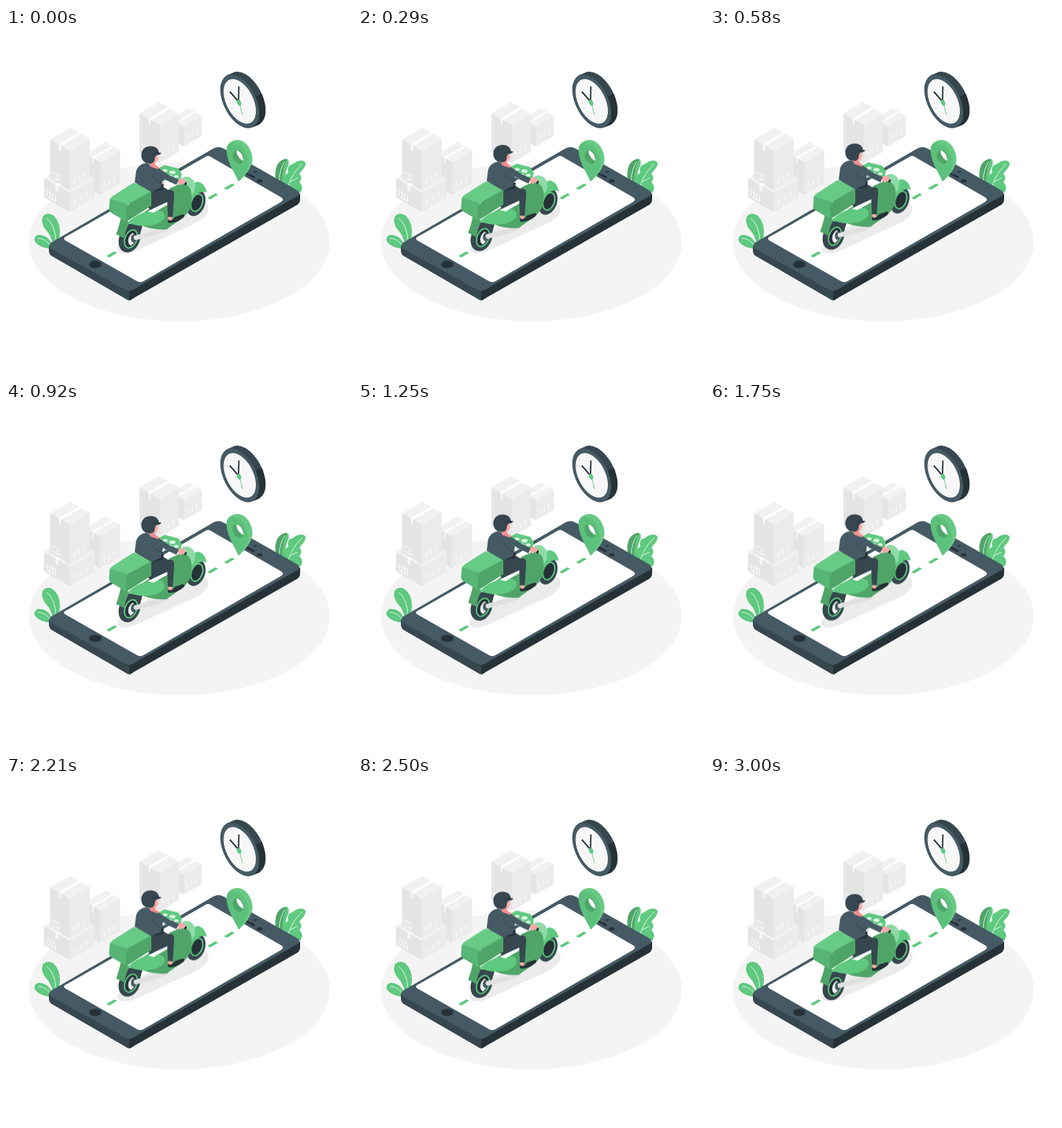
Animation of 500x500 px, one loop 3.04 s. Source, as an HTML page:

```html
<!DOCTYPE html>
<html lang="en">
<head>
<meta charset="utf-8">
<title>Scooter delivery</title>
<style>
html, body { margin: 0; width: 100%; height: 100%; overflow: hidden; background: #fff; }
svg { display: block; width: 100vw; height: 100vh; }
</style>
</head>
<body>
<svg viewBox="0 0 500 500">
  <ellipse cx="250.5" cy="309" rx="217.5" ry="115" fill="#f4f4f4"/>
  <g id="boxes"></g>

  <g id="plants" fill="#5fc97f">
    <path d="M64 319Q48 317 42 309Q39 302 46 299Q60 298 67 313Z"/>
    <path d="M68 314Q66 300 57 291Q50 282 53 273Q58 266 67 270Q78 278 78 296L76 309Z"/>
    <path d="M392 222C389 207 391 194 401 190C408 187 410 192 408 199C404 207 403 215 403 225Z"/>
    <path d="M390 220C388 207 390 194 401 190Q406 188 405 193C400 203 399 213 399 224Z" fill="#4fa568"/>
    <path d="M402 228C400 218 402 212 408 209C406 202 409 197 414 197C420 191 430 189 433 195C433 203 426 206 424 211C429 215 426 220 424 223C429 227 429 234 425 238Z"/>
    <g fill="none" stroke="#fff" stroke-width="1" opacity=".85">
      <path d="M46 304Q58 304 64 315M59 275Q71 285 72 307M395 220Q395 205 403 193"/>
      <path d="M408 228Q413 211 428 196M411 222L421 217"/>
    </g>
  </g>

  <g id="phone">
    <path d="M62 314V322Q62 327 67 330L174 392Q178 395 182 392L300 300Z" fill="#37474f"/>
    <path d="M178 378V394L420 256Q425 253 425 248V239Z" fill="#263238"/>
    <path d="M68 308.500L299 174.500Q307 169.500 315 174.500L420 234Q428 239 420 243.500L184 378Q178 381.500 172 378L67 320Q57 315 68 308.500Z" fill="#455a64"/>
    <path d="M87 302L288 187Q292 184.500 296 187L397 245Q402 248 397 251L199 365Q194 368 189 365L87 307Q82 304.500 87 302Z" fill="#fff" stroke="#fff" stroke-width="1.400"/>
    <g fill="#263238">
      <ellipse cx="129" cy="341.500" rx="9" ry="5.200"/>
      <ellipse cx="366.500" cy="221" rx="4.300" ry="2.500"/>
      <ellipse cx="360.500" cy="208" rx="2" ry="1.200"/>
    </g>
    <path d="M348 210.500L358 215.500" stroke="#263238" stroke-width="3.500" stroke-linecap="round"/>
  </g>

  <g id="dashes" fill="#5fc97f"></g>
  <path d="M161 317C160 327 173 328 188 322L274 282C287 276 295 266 292 257C288 249 271 250 260 256L170 304Z" fill="#ebebeb"/>

  <g id="pin">
    <path d="M319 172C321 165 330 161 337 162C348 164 357 178 356 192C354 205 344 215 336 222Z" fill="#68cb85"/>
    <path d="M319 181C317 169 325 163 334 167C344 172 351 185 350 197C348 209 340 215 336 222C331 210 321 197 319 181Z" fill="#5bc17b"/>
    <ellipse cx="335.500" cy="186" rx="7.500" ry="10.500" transform="rotate(-24 335.500 186)" fill="#4fa568"/>
    <path d="M333 177C338 177 343 184 343 192C338 190 333 184 333 177Z" fill="#fff"/>
  </g>

  <g id="clock"></g>

  <g id="scooter">
    <!-- front wheel -->
    <g transform="rotate(20 274.500 253)">
      <ellipse cx="274.500" cy="253" rx="13" ry="19.500" fill="#37474f"/>
      <ellipse cx="275.500" cy="252" rx="8" ry="13" fill="#263238" stroke="#5fc97f" stroke-width="2"/>
    </g>
    <path d="M261 247C262 236 269 224 277 222C285 224 289 230 290 238C282 234 272 240 268 253Z" fill="#5fc97f"/>

    <!-- rear wheel and exhaust -->
    <path d="M175 283L198 283L194 297L178 302Z" fill="#37474f"/>
    <g transform="rotate(22 178.500 304.500)">
      <ellipse cx="178.500" cy="304.500" rx="15" ry="20.500" fill="#37474f"/>
      <ellipse cx="180.500" cy="304" rx="8.500" ry="13.500" fill="#263238" stroke="#5fc97f" stroke-width="2"/>
    </g>
    <path d="M177 311Q175 302 183 296L189 302Q187 310 180 315Z" fill="#f0f0f0"/>
    <ellipse cx="184.500" cy="304" rx="4" ry="6" fill="#455a64"/>
    <path d="M188 303L206 298Q219 296 232 289" stroke="#e0e0e0" stroke-width="7" fill="none" stroke-linecap="round"/>
    <path d="M166 274L179 281Q173 289 171 304L159 298Q163 288 166 274Z" fill="#4fa568"/>

    <!-- front panel and leg shield -->
    <path d="M220 203L229 198L249 203L254 211L252 222L230 220Z" fill="#5fc97f"/>
    <g fill="#dff4e6">
      <ellipse cx="230" cy="206" rx="3.500" ry="2"/>
      <ellipse cx="240.500" cy="208.500" rx="4.500" ry="2.600"/>
      <ellipse cx="246" cy="214.500" rx="3.500" ry="2"/>
      <ellipse cx="237" cy="214" rx="3" ry="1.600"/>
    </g>
    <path d="M252 221C255 213 264 213 270 219C275 225 275 234 269 241L258 246Z" fill="#8edaa6"/>
    <path d="M236 232L252 225Q264 225 267 234Q270 245 267 259Q263 268 256 274L230 291Q226 262 236 232Z" fill="#4fa568"/>

    <!-- rear body -->
    <path d="M176 281L206 262L234 252L243 270L257 273L232 291Q211 292 198 286Z" fill="#4fa568"/>
    <path d="M176 281Q194 264 218 263Q231 264 229 275Q222 285 204 286Q188 287 176 281Z" fill="#5fc97f"/>
    <path d="M205 265L233 250L236 254L213 267Z" fill="#fff"/>
    <path d="M184 227L216 222L243 240L236 250L208 263Z" fill="#37474f"/>

    <!-- cargo box -->
    <path d="M150 248Q151 245 154 243L182 225Q185 223 189 225L211 236L174 256Z" fill="#68cb85"/>
    <path d="M150 247L176 255L174 280L152 267Q149 265 149 261Z" fill="#57b575"/>
    <path d="M173 264Q174 257 179 253L210 236V257L174 280Z" fill="#4fa568"/>

    <!-- rider -->
    <path d="M214 226Q222 222 228 226L226 236L214 236Z" fill="#263238"/>
    <path d="M210 238Q224 233 239 234Q243 235 243 240L241 273L234 274L233 250Q222 253 210 257Z" fill="#37474f"/>
    <path d="M234 273H240V279L235 278Z" fill="#ffa8a7"/>
    <path d="M234 277Q240 280 244 273L256 269Q260 271 255 275Q246 282 236 282Q233 281 234 277Z" fill="#263238"/>
    <path d="M202 195Q191 197 188 207L186 223L210 237Q218 233 224 231L228 211Q222 202 214 199Z" fill="#455a64"/>
    <path d="M248 219L255 217L259 222L253 227L249 226Z" fill="#ffa8a7"/>
    <path d="M255 222L260 223" stroke="#ffa8a7" stroke-width="4"/>
    <ellipse cx="259.500" cy="225" rx="1.600" ry="2.600" fill="#263238" transform="rotate(25 259.500 225)"/>
    <path d="M214 203L235 217L248 223" fill="none" stroke="#455a64" stroke-width="8" stroke-linejoin="round"/>
    <path d="M210 210Q213 222 229 224" fill="none" stroke="#263238" stroke-width="1" opacity=".5"/>
    <path d="M207 194L215 194L216 198L222 202L219 204L208 200Z" fill="#f28f8f"/>
    <path d="M212 184L218.500 183L220 189L217.500 194.500L212 195Z" fill="#ffa8a7"/>
    <path d="M195.500 183.500C195.500 176 201 170.700 209 170.700C216 170.700 220.500 174.500 221 180L224 181Q222 184 217 184L215 188Q216 195 208 196C200 196 195.500 191 195.500 183.500Z" fill="#37474f"/>
    <path d="M212 182Q218 180 224 181" stroke="#263238" stroke-width="1.200" fill="none"/>
  </g>
</svg>
<script>
const $ = id => document.getElementById(id);
const SLOPE = 0.577;
const poly = (points, fill) => `<polygon points="${points.join(' ')}" fill="${fill}"/>`;

// (x, y) is the near top corner; w runs left, d runs right, h runs down
function box(x, y, w, d, h, label) {
  const at = (a, b, c = 0) => [x - a * w + b * d, y - (a * w + b * d) * SLOPE + c];
  const mark = u => {
    const [mx, my] = at(0, u, h - 8);
    return `M${mx} ${my + 3}v-8m-2 4l2-4l2 2`;
  };
  let out = poly([at(0, 0), at(1, 0), at(1, 1), at(0, 1)], '#f1f1f1')
    + poly([at(0, 0), at(1, 0), at(1, 0, h), at(0, 0, h)], '#e4e4e4')
    + poly([at(0, 0), at(0, 1), at(0, 1, h), at(0, 0, h)], '#ebebeb')
    + poly([at(.44, 0), at(.56, 0), at(.56, 1), at(.44, 1)], '#fff')
    + poly([at(.44, 0), at(.56, 0), at(.56, 0, 8), at(.44, 0, 8)], '#f6f6f6')
    + `<path d="${[.22, .46, .7].map(mark).join('')}" fill="none" stroke="#f8f8f8"/>`;
  if (label) {
    const lines = [.83, .72, .61].map(a => `M${at(a, 0, h - 11)}v6`).join('');
    out += poly([at(.9, 0, h - 13), at(.52, 0, h - 13), at(.52, 0, h - 3), at(.9, 0, h - 3)], '#f3f3f3')
      + `<path d="${lines}" stroke="#dcdcdc" stroke-width="1.5"/>`;
  }
  return out;
}

$('boxes').innerHTML = [
  [257, 142, 19, 26, 29, false],
  [222, 140, 29, 28, 55, true],
  [136, 194, 21, 29, 47, false],
  [92, 238, 37, 36, 28, true],
  [92, 177, 28, 29, 57, true]
].map(b => box(...b)).join('');

$('dashes').innerHTML = [[145, 329.5], [291, 245.5], [315, 231.5]]
  .map(([x, y]) => `<path d="M${x} ${y}l11.500-6.800l4 2.300l-11.500 6.800z"/>`).join('');

// Circle lying in the plane that faces left
const disc = (x, y, r, fill) =>
  `<circle r="${r}" transform="matrix(.83 .5 0 1.03 ${x} ${y})" fill="${fill}"/>`;

function clock(x, y, r) {
  const dx = 9, dy = -4, tx = r * .566, ty = r * 1.094;
  const side = [[x - tx, y - ty], [x - tx + dx, y - ty + dy], [x + tx + dx, y + ty + dy], [x + tx, y + ty]];
  const back = disc(x + dx, y + dy, r, 'currentColor') + poly(side, 'currentColor');
  return `<clipPath id="low"><path d="M300 129L380 90V160H300Z"/></clipPath>
    <g color="#37474f">${back}</g>
    <g color="#263238" clip-path="url(#low)">${back}</g>
    ${disc(x, y, r, '#455a64')}${disc(x, y, r - 5.800, '#f7f7f7')}
    <g fill="none" stroke="#263238" stroke-width="2">
      <path d="M336 107L336.500 84.500M336.500 107L323.500 92"/>
      <path d="M337 108L342 126" stroke="#5fc97f" stroke-width="1"/>
    </g>
    <ellipse cx="336.800" cy="108" rx="3" ry="4.400" transform="rotate(-20 336.800 108)" fill="#5fc97f"/>`;
}
$('clock').innerHTML = clock(337.800, 106, 34);

$('scooter').animate(
  [0, -10, 0].map(y => ({ transform: `translateY(${y}px)` })),
  { duration: 3040, iterations: Infinity, easing: 'linear' }
);
</script>
</body>
</html>
```
